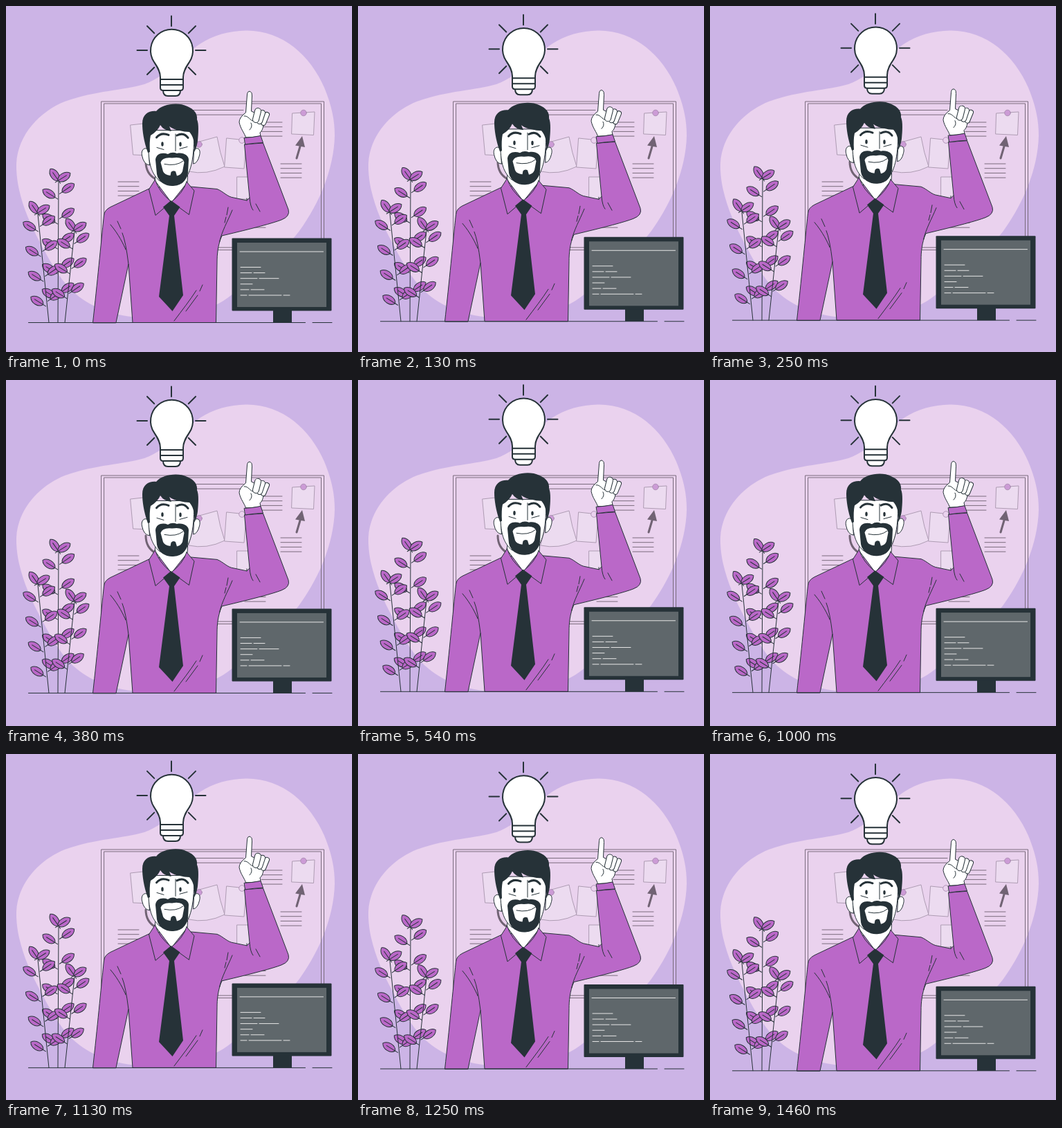
These frames come from a looping animation (500x500 px, 1500 ms). An HTML page:

```html
<!DOCTYPE html>
<html lang="en">
<head>
<meta charset="utf-8">
<title>Bright idea</title>
<style>
  html, body { margin: 0; height: 100%; overflow: hidden; background: #ccb4e6; }
  svg { display: block; width: 100vw; height: 100vh; }
  path, circle, ellipse, rect { stroke-linecap: round; stroke-linejoin: round; }
  .ink { stroke: #263238; stroke-width: 1; fill: none; }
  .shirt { fill: #ba68c8; }
  .skin { fill: #fff; }
  .dark { fill: #263238; }
  .bulb { stroke: #263238; stroke-width: 2; fill: #fff; }
  .board { stroke: #7a6b7d; stroke-width: 1; fill: none; }
  .paper { stroke: #ae9cb3; fill: #ecdbf0; }
  .pin { stroke: #a286aa; stroke-width: .8; fill: #cc9bd6; }
  .arrow { stroke: #716374; stroke-width: 3; }
</style>
</head>
<body>
<svg viewBox="0 0 500 500">
  <path fill="#ead2ee" d="M347 35.5C400 35 440 72 460 118C471 145 475 165 475 187C474 235 453 285 424 325C395 362 350 400 320 422C285 447 235 452 190 450C150 447 115 432 92 408C78 393 66 374 50 343C32 310 14 268 15 228C17 185 50 152 85 138C130 122 170 122 200 113C235 100 255 72 280 55C300 42 322 36 347 35.5Z"/>

  <g class="board">
    <path d="M138 138H459.500V352.500H138ZM142 141H455.500V349H142Z"/>
    <path id="notes"/>
    <g class="paper">
      <path d="M180 172L207 169V216L184 215Z"/>
      <path d="M276 197L305 189Q309 212 316 232Q290 245 264 239Z"/>
      <path d="M319 191L347 194L344 235L316 233Z"/>
      <path d="M334 247H353V279H334Z"/>
      <path d="M414 155L446 153L444.500 186.500L413 185Z"/>
    </g>
    <g class="pin">
      <circle cx="279" cy="200" r="4.3"/>
      <circle cx="341" cy="194" r="4.3" fill="#ead2ee"/>
      <circle cx="430" cy="154.500" r="4.3"/>
    </g>
    <path class="arrow" d="M202 225C202 237 207 245 216 250M420 220L425 203"/>
    <path fill="#716374" stroke="none" d="M428 188L418 201.500L432 204Z"/>
  </g>

  <g id="float">
    <g id="plant" class="ink"></g>

    <g class="ink">
      <path class="skin" d="M346.500 190C345 184 339 178 337 168Q337 161 346.500 154L348.500 128Q349 122.500 353 123.500Q356 125 355.500 130L354.500 152L372 160V172Q371 180 367 183L368 188Q357 190 346.500 190Z"/>
      <g id="fingers"></g>
      <path d="M344 159C350 158 353 166 357 166M354 169Q357 174 352 179"/>
      <path class="shirt" d="M125.500 457.500C132 400 137 345 141.500 303Q142 295 151 290.500L211 262L266 261L305 264.500C314 268 320 276 329 277L348 281L352 277L344.500 200L371.500 198L408 294Q411 304 398 309Q380 316 312 332C306 345 305 360 305 370L303.500 457.500H183L177 373L159 457.500Z"/>
      <path class="shirt" d="M344.500 190.500Q356 190 368 187.500L371.500 197.500Q358 198 346 200Z"/>
      <path d="M352 277Q353 290 357 295M361 286L367 297M348 278V281M321 291L319 302M318 305L316 313M327 295C320 312 312 325 308.500 341M151 316C163 330 170 345 173 352M161 311L166 322M168 328Q173 340 177 373M243 455C255 439 266 425 275 411M260 441L277 418M280 412L284 403"/>
      <path class="skin" d="M217 240L215 252L239 284L262 255L263 235Z"/>
      <path class="shirt" d="M215.500 251L206.500 265L216 302.500L239 283Q221 269 215.500 251ZM261 254L272 267L264.500 301.500L239 283Q256 270 261 254Z"/>
    </g>
    <path class="dark" d="M238.500 281L227 290.500L236 303L221 420L240.500 441L256 418L243 303L251.500 290.500Z"/>

    <g class="ink">
      <path class="skin" d="M206 207C199 203 195 209 196.500 216Q199 229 207 230ZM272 207C279 203 281.500 209 279.500 216Q277 227 271 228Z"/>
      <path class="skin" d="M206 180V210C207 233 212 243 221 252Q238 264 257 252C268 240 272 218 272 180Z"/>
      <path d="M218 204.500L228 207.500M251 206.500L262 203.500M245 185V209.500"/>
    </g>
    <g class="dark">
      <path d="M205 212C199 195 197 180 197 170C197 156 207 151 217 152C225 142 248 138 262 145C272 149 277 156 276 164C279 170 278 185 277 195C276 202 274 208 272 211C273 195 270 188 265 182Q258 182 251 180Q243 179 236 174L239 181Q228 180 223 172Q219 181 209 187Q207 196 208 211Z"/>
      <ellipse cx="226" cy="199.500" rx="1.700" ry="3.200"/>
      <ellipse cx="252" cy="199.800" rx="1.700" ry="3.200"/>
      <path d="M216 222C217 213 226 211 234 214Q240 210 247 213C256 211 264 216 264 222L263 241C260 256 250 260 240 260C230 260 220 254 218 243Z"/>
    </g>
    <path class="skin" d="M223.500 226Q226 218 240 219.500Q256 217 257.500 226L255 239Q253 244 247 245.500L245 239Q241 237 238.500 240L237.500 245Q229 244 227 239Z"/>
    <path class="ink" d="M229 228.500Q246 232 256 224"/>
    <path class="ink" style="stroke-width:3" d="M217.500 190Q224 182 235 186.500M247 187Q257 182 263 190.500"/>

    <path class="ink" d="M32.500 457.500H432.500M443 457.500H471"/>
    <path class="dark" d="M386 438H413V457.500H386Z"/>
    <rect class="dark" x="326.500" y="335.500" width="144" height="105" rx="1"/>
    <rect x="334" y="342" width="129" height="93" fill="#5f676b"/>
    <path id="code" fill="none" stroke="#e6e6e6"/>

    <g class="bulb">
      <path id="rays"/>
      <path d="M223 107V103C223 94 218 87 214 81A30.500 30.500 0 1 1 265 81C261 87 256 94 256 103V107Z"/>
      <path d="M227 121.500H252Q252 130 245 130H234Q227 130 227 121.500Z"/>
      <path d="M223 106H256V118Q256 122 252 122H227Q223 122 223 118ZM223 114H256"/>
    </g>
  </g>
</svg>
<script>
  const $ = id => document.getElementById(id);
  const repeat = (n, make) => Array.from({ length: n }, (_, i) => make(i)).join('');

  // Written lines on the board: one wide pair, then equal blocks
  const block = (x, y, width = 30, rows = 4) => repeat(rows, i => `M${x} ${y + 6.7 * i}h${width}`);
  $('notes').setAttribute('d', block(262, 150.5, 81, 2) + block(369, 168) +
    block(397, 228) + block(162, 254) + block(345, 300));

  // Word lengths of each row on the screen
  const words = [[29], [16, 16], [24, 28], [17], [12, 19], [9, 47, 9]];
  $('code').setAttribute('d', 'M338 355h120.5' + words.map((row, i) =>
    `M339 ${377.5 + 8.1 * i}` + row.map(w => `h${w}m3 0`).join('')).join(''));

  $('rays').setAttribute('d', repeat(7, i => {
    const a = (i + 3) * Math.PI / 4;
    const at = r => `${239 + r * Math.cos(a)} ${64 + r * Math.sin(a)}`;
    return `M${at(35)}L${at(49.5)}`;
  }));

  $('fingers').innerHTML = repeat(3, n => {
    const i = 2 - n, d = `M${364 + 6.5 * i} ${152 + 2.5 * i}l${-3 - i} 12`;
    return `<path d="${d}" style="stroke-width:${10 - i}"/>
      <path d="${d}" style="stroke:#fff;stroke-width:${8 - i}"/>`;
  });

  const leaf = (x, y, angle) => `<g transform="translate(${x} ${y}) rotate(${angle})">
    <path class="shirt" d="M-10.500 0C-7 -7.500 6 -7.500 10.500 0C6 7.500 -7 7.500 -10.500 0Z"/>
    <path d="M-15 0H4"/></g>`;

  // A stem with two leaves at its tip and pairs of leaves further down
  function stem(top, y, foot) {
    const xAt = h => top + (foot - top) * (h - y) / (457.5 - y);
    const pairs = Math.floor((445 - y) / 36);
    return `<path d="M${top} ${y}L${foot} 457.5"/>` +
      leaf(top - 6, y - 10, 235) + leaf(top + 8, y - 7, -32) +
      repeat(pairs, i => {
        const h = y + 17 + 36 * i;
        return leaf(xAt(h) - 14, h, 212) + leaf(xAt(h) + 14, h - 8, -34);
      });
  }
  $('plant').innerHTML = stem(76, 254, 75) + stem(46, 301, 62) + stem(99, 326, 85);

  const PERIOD = 1500, RISE = 10, LEAD = 30;
  function draw(now) {
    const phase = (now + LEAD) % PERIOD / PERIOD;
    const lift = RISE * (1 - Math.abs(1 - 2 * phase));
    $('float').setAttribute('transform', `translate(0 ${0.4 - lift})`);
    requestAnimationFrame(draw);
  }
  draw(performance.now());
</script>
</body>
</html>
```
